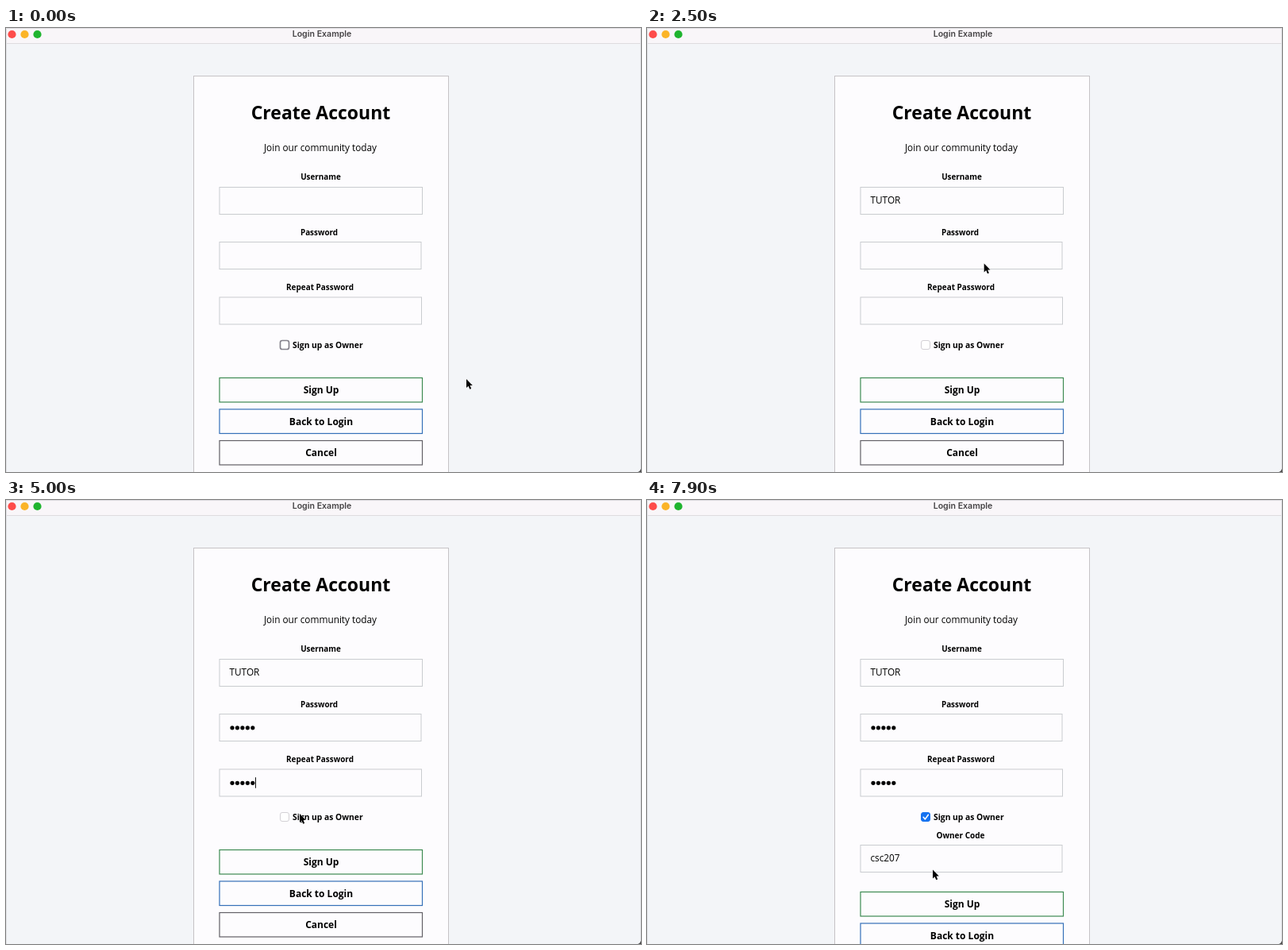
Animation of 800 by 559 pixels, one loop 8 s. Source, as an HTML page:

```html
<!DOCTYPE html>
<html lang="en">
<head>
<meta charset="utf-8">
<title>Login Example</title>
<style>
html, body { margin: 0; width: 100%; height: 100%; overflow: hidden; background: #f3f5f8; }
svg { display: block; width: 100%; height: 100%; }
text { font-family: "Open Sans", "Noto Sans", sans-serif; fill: #000; white-space: pre; }
.bar { font: 600 10.6px Inter, sans-serif; fill: #454345; }
.mid { text-anchor: middle; }
.bold { font-weight: 700; }
.value { font-size: 11.8px; font-weight: 500; }
.field { fill: #fdfcfe; stroke: #c9cccf; }
</style>
</head>
<body>
<svg id="stage" viewBox="0 0 800 559"></svg>
<script>
const LOOP = 8000, STEP = 100;
const stage = document.getElementById('stage');

function add(tag, attrs, parent = stage, content = '') {
  const node = document.createElementNS('http://www.w3.org/2000/svg', tag);
  for (const key in attrs) node.setAttribute(key, attrs[key]);
  node.textContent = content;
  parent.appendChild(node);
  return node;
}
const rect = (x, y, width, height, attrs, parent) => add('rect', { x, y, width, height, ...attrs }, parent);
const label = (str, x, y, size, cls = 'mid bold', parent) =>
  add('text', { x, y, class: cls, style: size ? `font-size:${size}px` : '' }, parent, str);
const show = (node, on) => node.setAttribute('visibility', on ? 'visible' : 'hidden');

// Window and card
rect(0, 0, 800, 559, { fill: '#f3f5f8' });
rect(236.5, 60.5, 321, 520, { fill: '#fdfcfe', stroke: '#c6c3c6' });
rect(0, 0, 800, 19, { fill: '#f9f6f9' });
rect(0, 19, 800, 1, { fill: '#dedcdf' });
rect(0, 0, 800, 1, { fill: '#dddce0' });
rect(0, 0, 1, 559, { fill: '#dfe0e3' });
rect(799, 0, 1, 559, { fill: '#dfe0e3' });
add('path', { d: 'M800 555V559H796Q799 558 800 555Z', fill: '#444' });
['#fe4c4a', '#fbb428', '#1fb42f'].forEach((fill, i) => add('circle', { cx: 7.5 + 16 * i, cy: 8, r: 5.1, fill }));
label('Login Example', 398, 11.3, 0, 'bar mid');
label('Create Account', 396.5, 115, 23);
label('Join our community today', 396, 155, 11.8, 'mid');

// Input rows
const codeRow = add('g', {});
function makeField(y, width, parent) {
  rect(269, y + .5, width, 34, { class: 'field' }, parent);
  return {
    y,
    value: label('', 281.5, y + 21.2, 0, 'value', parent),
    dots: [0, 1, 2, 3, 4].map(i => add('circle', { cx: 285 + 6.45 * i, cy: y + 17.8, r: 2.6 }, parent))
  };
}
label('Username', 396.5, 191.3, 9.9);
label('Password', 394.5, 260.5, 9.9);
label('Repeat Password', 395.5, 329.6, 9.95);
label('Sign up as Owner', 361, 402.8, 10.3, 'bold');
label('Owner Code', 395, 425.6, 10, 'mid bold', codeRow);
const fields = [
  makeField(200, 255.5), makeField(269, 254), makeField(338.5, 254.5), makeField(434, 254, codeRow)
];

const box = rect(345.5, 393.5, 11, 11, { rx: 2.5 });
const tick = add('path', { d: 'M348.2 399.3l2.2 2.6 4-5.6', fill: 'none', stroke: '#fff', 'stroke-width': 1.6,
  'stroke-linecap': 'round', 'stroke-linejoin': 'round' });

const buttons = add('g', {});
[['Sign Up', 440, '#3d8b52'], ['Back to Login', 479.5, '#3470b8'], ['Cancel', 519, '#626066']].forEach(([name, y, stroke]) => {
  rect(269, y + .5, 255.5, 30.5, { fill: '#fdfcfe', stroke, 'stroke-width': 1.2 }, buttons);
  label(name, 397, y + 20, 12, 'mid bold', buttons);
});

const caret = rect(281.5, 0, 1, 13.5, { fill: '#111' });
const ring = add('circle', { r: 17.4, fill: 'none', stroke: '#111', 'stroke-width': 1.4 });
const pointer = add('path', { d: 'M0 0V11L2.5 8.7 4.3 12.8 6.2 12 4.5 8.1H7.8Z', fill: '#000', stroke: '#fff',
  'stroke-width': 1, 'paint-order': 'stroke' });

// Pointer stops: time, x, y
const route = [
  [300, 580, 442], [800, 440, 205.5], [1200, 440, 205.5], [1300, 439, 205],
  [2100, 439, 205], [2600, 423, 307], [3400, 423, 307], [3800, 416, 350],
  [4700, 416, 350], [5000, 370, 395], [5200, 352, 398], [5400, 352, 398],
  [5700, 361, 467], [6500, 361, 467], [6600, 360, 465.5]
];
const clicks = [800, 2600, 3800, 5200, 5800];
const focus = [[800, 0], [2600, 1], [3800, 2], [5200, -1], [5700, 3]];
const keys = [
  { text: 'TUTOR', at: [1300, 1500, 1600, 1700, 1900] },
  { at: [2800, 2900, 3000, 3100, 3200] },
  { at: [4000, 4200, 4400, 4500, 4600] },
  { text: 'csc207', at: [7000, 7100, 7200, 7300, 7400, 7500] }
];

function pointerAt(t) {
  const i = route.findIndex(p => p[0] > t);
  if (i === 0) return route[0].slice(1);
  if (i < 0) return route[route.length - 1].slice(1);
  const [t0, x0, y0] = route[i - 1], [t1, x1, y1] = route[i];
  const u = (t - t0) / (t1 - t0), k = u * u * (3 - 2 * u);
  return [x0 + (x1 - x0) * k, y0 + (y1 - y0) * k];
}

function draw(t) {
  const checked = t >= 5200;
  show(codeRow, checked);
  show(tick, checked);
  buttons.setAttribute('transform', `translate(0 ${checked ? 53 : 0})`);
  box.setAttribute('fill', checked ? '#1673f0' : '#fff');
  box.setAttribute('stroke', checked ? '#1673f0' : t < 800 ? '#85838c' : '#d3d1d5');
  box.setAttribute('stroke-width', t < 800 ? 1.7 : 1);

  const counts = keys.map(k => k.at.filter(at => at <= t).length);
  fields.forEach((f, i) => {
    const text = keys[i].text;
    f.value.textContent = text ? text.slice(0, counts[i]) : '';
    f.dots.forEach((dot, n) => show(dot, !text && n < counts[i]));
  });

  // Caret restarts its blink at each focus change or key press
  const [since, active] = focus.filter(f => f[0] <= t).pop() || [0, -1];
  show(caret, false);
  if (active >= 0) {
    const { text, at } = keys[active], n = counts[active];
    const last = n ? at[n - 1] : since;
    const width = !n ? 0 : text ? fields[active].value.getComputedTextLength() : n * 6.5;
    caret.setAttribute('x', 281.5 + width);
    caret.setAttribute('y', fields[active].y + 10.7);
    show(caret, (t - last) % 800 < 400 + (active === 2 ? 100 : 0));
  }

  const [x, y] = pointerAt(t);
  pointer.setAttribute('transform', `translate(${x} ${y})`);
  ring.setAttribute('cx', x - .8);
  ring.setAttribute('cy', y + .6);
  show(ring, clicks.some(c => t >= c && t < c + 200));
}

const start = performance.now();
function frame() {
  const t = (performance.now() - start) % LOOP;
  draw(Math.floor(t / STEP) * STEP);
  requestAnimationFrame(frame);
}
frame();
</script>
</body>
</html>
```
